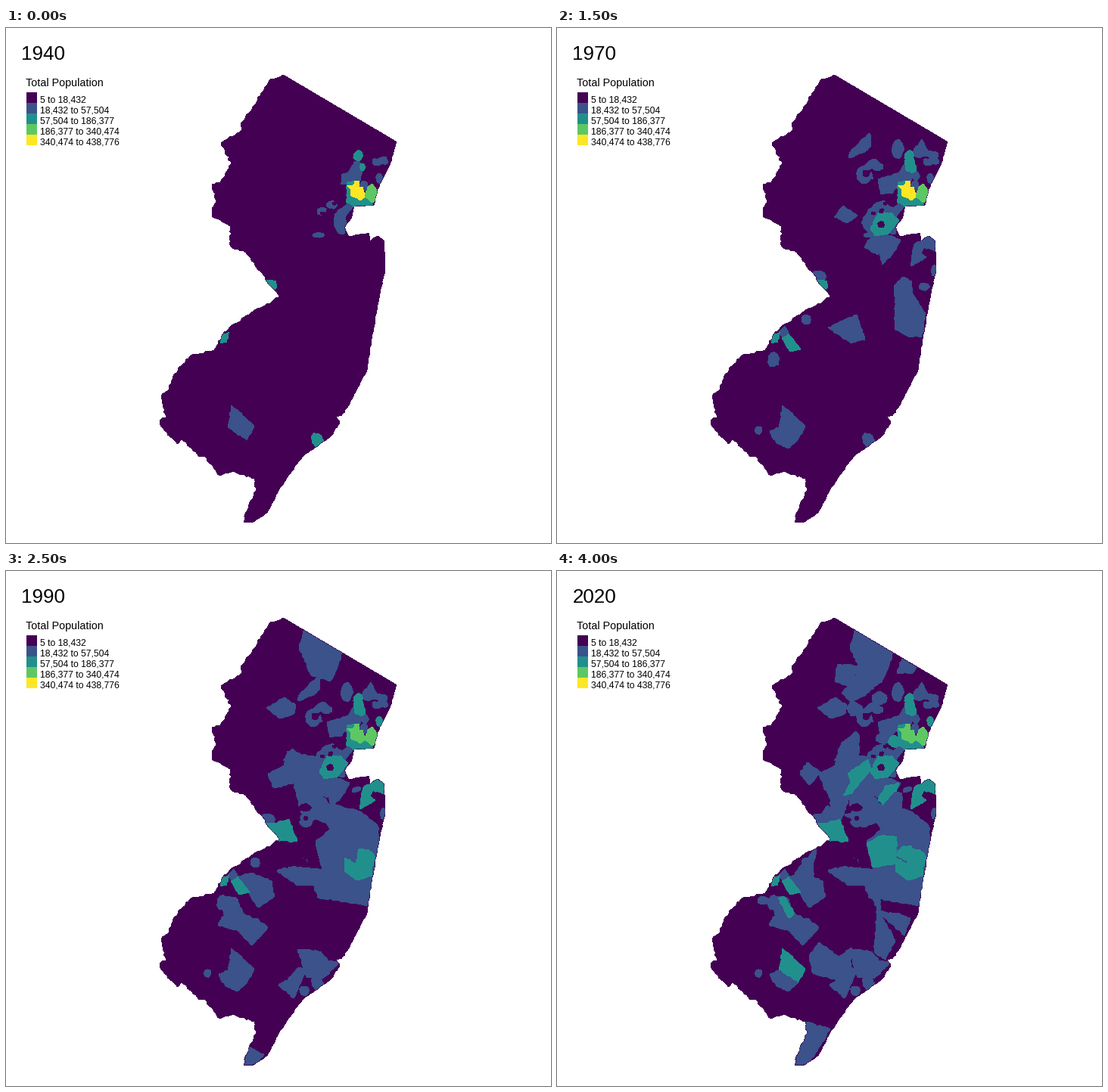
Write a matplotlib script that moves like this. It is 720x681 px and loops after 4.5 s.

```python
import math
import random

import matplotlib.pyplot as plt
from matplotlib.animation import FuncAnimation
from matplotlib.patches import Polygon, Rectangle

W, H, DPI = 720, 681, 64
COLORS = {"dark": "#440154", "blue": "#3B528B", "teal": "#21908C",
          "green": "#5DC863", "yellow": "#FDE725"}
BREAKS = ["5", "18,432", "57,504", "186,377", "340,474", "438,776"]
START, STEP, DECADES = 1940, 10, 9

rng = random.Random(4)
plt.rcParams["font.family"] = "Liberation Sans"
fig = plt.figure(figsize=(W / DPI, H / DPI), dpi=DPI, facecolor="white")
ax = fig.add_axes([0, 0, 1, 1])
ax.set_xlim(0, W)
ax.set_ylim(H, 0)
ax.axis("off")


def ragged(xy, amp, step=3.5):
    """Walk along the key points and push each small step sideways."""
    pts = list(zip(xy[::2], xy[1::2]))
    out = []
    for (x0, y0), (x1, y1) in zip(pts, pts[1:]):
        size = math.dist((x0, y0), (x1, y1)) or 1
        n = max(1, round(size / step))
        for i in range(n):
            t, push = i / n, rng.uniform(-amp, amp) if i else 0
            out.append((x0 + (x1 - x0) * t - (y1 - y0) / size * push,
                        y0 + (y1 - y0) * t + (x1 - x0) / size * push))
    return out


def text(x, y, s, px):
    return ax.text(x, y, s, fontsize=px * 72 / DPI, color="black",
                   ha="left", va="baseline")


# State outline, clockwise from the northern tip
border = (366, 62, 515.5, 150.5)
shore = (515.5, 150.5, 508, 178, 491, 213, 486, 234, 460, 236, 457, 249,
         447, 264, 453, 276, 479, 271, 481, 282, 491, 275, 499, 281,
         501, 317, 491, 366, 484, 405, 477, 452, 452, 500, 443, 513,
         436, 514, 441, 522, 428, 541, 396, 563, 386, 574, 362, 608,
         345, 641, 325, 654, 314, 653)
bay = (314, 653, 320, 632, 330, 612, 328, 596, 300, 586, 283, 592, 262, 566,
       255, 567, 233, 544, 226, 550, 205, 527, 204, 518, 211, 515, 205, 487,
       213, 480, 228, 449, 246, 432, 275, 426, 288, 402, 315, 382, 361, 356)
river = (361, 356, 335, 321, 317, 297, 297, 289, 296, 262, 273, 250, 272, 238,
         278, 230, 272, 206, 283, 204, 298, 180, 284, 152, 311, 135, 310, 126,
         325, 107, 348, 69, 366, 62)
outline = (ragged(border, 0) + ragged(shore, 0.6) + ragged(bay, 1.4)
           + ragged(river, 1.3))
state = Polygon(outline, fc=COLORS["dark"], lw=0, aa=False)
ax.add_patch(state)

towns = []


def land(*xy, **since):
    """Area through key points; since tells the year a class begins."""
    patch = Polygon(ragged(xy + xy[:2], 1), lw=0, aa=False)
    ax.add_patch(patch)
    patch.set_clip_path(state)
    towns.append((patch, since))


def spot(x, y, w, h, tilt=0, **since):
    """Small irregular town around a centre."""
    c, s = math.cos(math.radians(tilt)), math.sin(math.radians(tilt))
    xy = []
    for k in range(9):
        a, r = k * math.tau / 9, rng.uniform(0.45, 0.58)
        u, v = r * w * math.cos(a), r * h * math.sin(a)
        xy += [x + u * c - v * s, y + u * s + v * c]
    land(*xy, **since)


# Northern highlands
land(428, 98, 444, 108, 437, 130, 428, 146, 403, 138, blue=1980)
land(394, 78, 430, 98, 420, 142, 403, 138, 387, 100, blue=1990)
land(403, 126, 430, 145, 404, 166, 388, 172, 376, 162, blue=2000)
land(370, 123, 402, 126, 384, 152, 367, 146, blue=2010)
land(385, 172, 390, 160, 413, 139, 415, 156, 404, 165, blue=1970)
land(344, 181, 368, 167, 383, 178, 381, 188, 362, 195, blue=1980)
land(381, 180, 390, 171, 404, 180, 403, 188, 388, 192, blue=2000)
land(449, 135, 456, 116, 475, 127, 470, 135, blue=2000)
land(397, 187, 418, 173, 431, 181, 431, 186, 422, 189, 416, 185, 408, 188,
     blue=1960)
land(397, 188, 404, 188, 404, 196, 411, 198, 416, 190, 418, 199, 404, 206,
     396, 199, blue=1970)

# Northeast suburbs
spot(426, 168, 19, 17, blue=2000)
spot(450, 160, 15, 24, blue=1960)
spot(478, 163, 14, 16, blue=1950)
land(477, 156, 482, 147, 490, 162, 503, 165, 503, 171, 486, 170, blue=1960)
land(484, 174, 503, 170, 504, 179, 486, 181, blue=1940)
land(424, 199, 444, 194, 450, 206, 444, 218, 428, 220, blue=1960)
spot(433, 222, 22, 13, blue=2000)
land(442, 207, 443, 194, 452, 191, 460, 177, 467, 177, 472, 188, 467, 203,
     blue=1940)
spot(474, 196, 9, 12, blue=1960)
spot(473, 209, 10, 12, blue=1940)
spot(493, 199, 8, 12, blue=1940, teal=1990)
spot(465, 169, 12, 13, teal=1940)
spot(471, 184, 7, 9, teal=1940)
land(461, 172, 471, 172, 475, 187, 469, 192, 460, 187, teal=1960)
spot(446, 226, 16, 16, teal=2020)
land(451, 204, 460, 202, 456, 222, 477, 223, 486, 236, 458, 237, 450, 231,
     teal=1940)
land(450, 208, 458, 209, 461, 202, 466, 202, 467, 210, 472, 211, 475, 223,
     468, 228, 456, 222, 456, 214, yellow=1940, green=1980)
land(478, 210, 484, 206, 492, 218, 485, 231, 474, 222, green=1940)

# Central corridor
land(347, 268, 366, 266, 372, 238, 408, 246, 420, 276, 408, 288, 432, 313,
     421, 333, 390, 320, 380, 280, 354, 287, blue=1990)
land(352, 285, 380, 280, 385, 304, 376, 328, 357, 331, 362, 303, blue=2010)
land(371, 240, 376, 227, 395, 212, 400, 219, 398, 248, blue=2000)
land(321, 268, 330, 253, 349, 266, 333, 283, blue=2000)
land(366, 250, 378, 235, 397, 248, 384, 258, blue=1970)
land(346, 268, 376, 253, 388, 275, 354, 287, blue=1980)
land(345, 328, 357, 310, 368, 320, 360, 334, blue=2000)
land(380, 322, 395, 318, 421, 333, 404, 339, blue=2000)
spot(397, 329, 18, 18, blue=1980)
spot(396, 327, 5, 5, dark=1940)
spot(395, 313, 14, 10, dark=1940)
land(402, 258, 411, 241, 424, 230, 443, 237, 446, 246, 432, 247, 433, 262,
     414, 274, blue=1960)
land(406, 290, 415, 276, 436, 272, 424, 300, blue=1960)
spot(430, 234, 13, 10, blue=1940)
spot(417, 242, 12, 9, -25, blue=1940)
spot(413, 274, 16, 6, blue=1940)
land(434, 246, 452, 232, 458, 236, 448, 250, 451, 262, 447, 272, 439, 271,
     433, 258, blue=1940)
land(432, 246, 442, 244, 452, 254, 438, 272, 433, 262, teal=1960)
land(414, 266, 424, 245, 437, 245, 438, 272, 420, 275, teal=1970)
spot(428, 260, 8, 8, dark=1940)
for _ in range(5):
    spot(rng.uniform(405, 440), rng.uniform(232, 246), 5, 4, dark=1940)
land(424, 289, 436, 273, 454, 280, 448, 293, 430, 313, blue=1960)
land(424, 303, 433, 285, 452, 280, 448, 294, 433, 312, teal=2000)
land(378, 297, 388, 280, 384, 268, 411, 249, 415, 262, 389, 295, teal=2010)

# Shore counties
land(421, 332, 432, 308, 470, 319, 491, 337, 493, 362, 482, 425, 441, 402,
     413, 427, 405, 415, 386, 416, 358, 396, 417, 394, 409, 358, 428, 342,
     blue=1980)
land(432, 310, 446, 292, 456, 294, 455, 322, blue=2000)
land(406, 413, 441, 402, 483, 406, 478, 442, 412, 432, blue=1990)
land(446, 340, 458, 329, 469, 335, 469, 350, 487, 377, 482, 408, 466, 409,
     447, 399, blue=1970)
land(409, 360, 428, 350, 449, 352, 447, 387, 417, 392, teal=2020)
land(447, 379, 460, 386, 484, 390, 483, 403, 465, 409, 448, 398, teal=1980)
land(466, 368, 478, 368, 487, 377, 484, 391, 462, 387, teal=1990)
land(447, 375, 455, 365, 468, 363, 470, 388, teal=2000)
land(469, 300, 471, 287, 491, 274, 502, 283, 499, 295, 485, 290, 481, 297,
     488, 303, 468, 315, blue=1960, teal=1980)
spot(463, 289, 13, 6, -20, blue=1980)
spot(498, 321, 7, 14, blue=1950)
spot(485, 342, 13, 10, blue=1960)
land(423, 450, 448, 452, 467, 459, 459, 482, blue=2000)
land(407, 412, 426, 430, 428, 455, 447, 488, 434, 514, 419, 504, 423, 447,
     blue=2010)

# Delaware valley
spot(346, 328, 19, 14, blue=1960)
land(342, 334, 357, 334, 358, 342, 354, 347, teal=1940)
land(348, 336, 374, 328, 385, 358, 358, 356, teal=1990)
spot(274, 225, 8, 7, blue=1950, dark=1970)
land(374, 390, 396, 379, 401, 396, 380, 397, blue=1960)
land(358, 396, 396, 379, 407, 412, 388, 417, blue=1970, dark=1980)
land(358, 396, 378, 391, 417, 394, 405, 415, 386, 416, blue=1980)
spot(329, 386, 13, 12, blue=1970)
land(306, 404, 324, 399, 351, 410, 354, 431, 333, 445, blue=1990)
land(314, 400, 343, 366, 338, 394, 340, 410, blue=2000)
land(322, 416, 334, 413, 333, 445, blue=1980)
land(293, 403, 301, 394, 306, 404, 299, 409, blue=1950)
land(297, 410, 306, 404, 322, 425, 307, 427, blue=1960, teal=1970)
land(283, 406, 295, 402, 291, 416, 284, 417, teal=1940)
spot(286, 438, 14, 20, blue=1970)
land(283, 430, 304, 432, 314, 453, 346, 471, 333, 487, 315, 461, 288, 455,
     blue=1980)
land(288, 456, 330, 459, 346, 471, 325, 495, 305, 475, 280, 468, blue=1990)
spot(273, 436, 15, 10, blue=2000)
land(292, 433, 299, 430, 314, 452, 307, 459, teal=2000)

# South
land(298, 499, 328, 526, 318, 545, 293, 528, blue=1940, teal=2010)
land(281, 533, 293, 528, 318, 545, 305, 556, 290, 549, blue=1960)
spot(266, 532, 9, 10, blue=1960)
land(333, 509, 346, 491, 372, 510, 389, 498, 388, 524, 372, 541, 338, 532,
     blue=2000)
land(385, 500, 416, 503, 425, 515, 442, 516, 419, 539, 398, 538, blue=1990)
land(360, 547, 372, 541, 387, 524, 398, 527, 380, 565, blue=1980)
spot(394, 555, 13, 13, blue=1980)
spot(411, 545, 15, 19, teal=1940, blue=1970)
land(330, 596, 361, 606, 340, 640, 319, 630, blue=2010)
land(319, 629, 341, 639, 333, 650, 314, 654, blue=1990)

# Title and legend
title = text(20.4, 42, str(START), 26)
text(26, 77, "Total Population", 14.4)
for i, color in enumerate(COLORS.values()):
    y = 85 + 14 * i
    ax.add_patch(Rectangle((27, y), 14, 14, fc=color, lw=0, aa=False))
    text(44.7, y + 13, f"{BREAKS[i]} to {BREAKS[i + 1]}", 12.3)


def draw(i):
    year = START + STEP * i
    title.set_text(str(year))
    for patch, since in towns:
        begun = [(y, name) for name, y in since.items() if y <= year]
        patch.set_visible(bool(begun))
        if begun:
            patch.set_facecolor(COLORS[max(begun)[1]])
    return []


anim = FuncAnimation(fig, draw, frames=DECADES, interval=500, repeat=True,
                     repeat_delay=0, blit=False)
plt.show()
```
